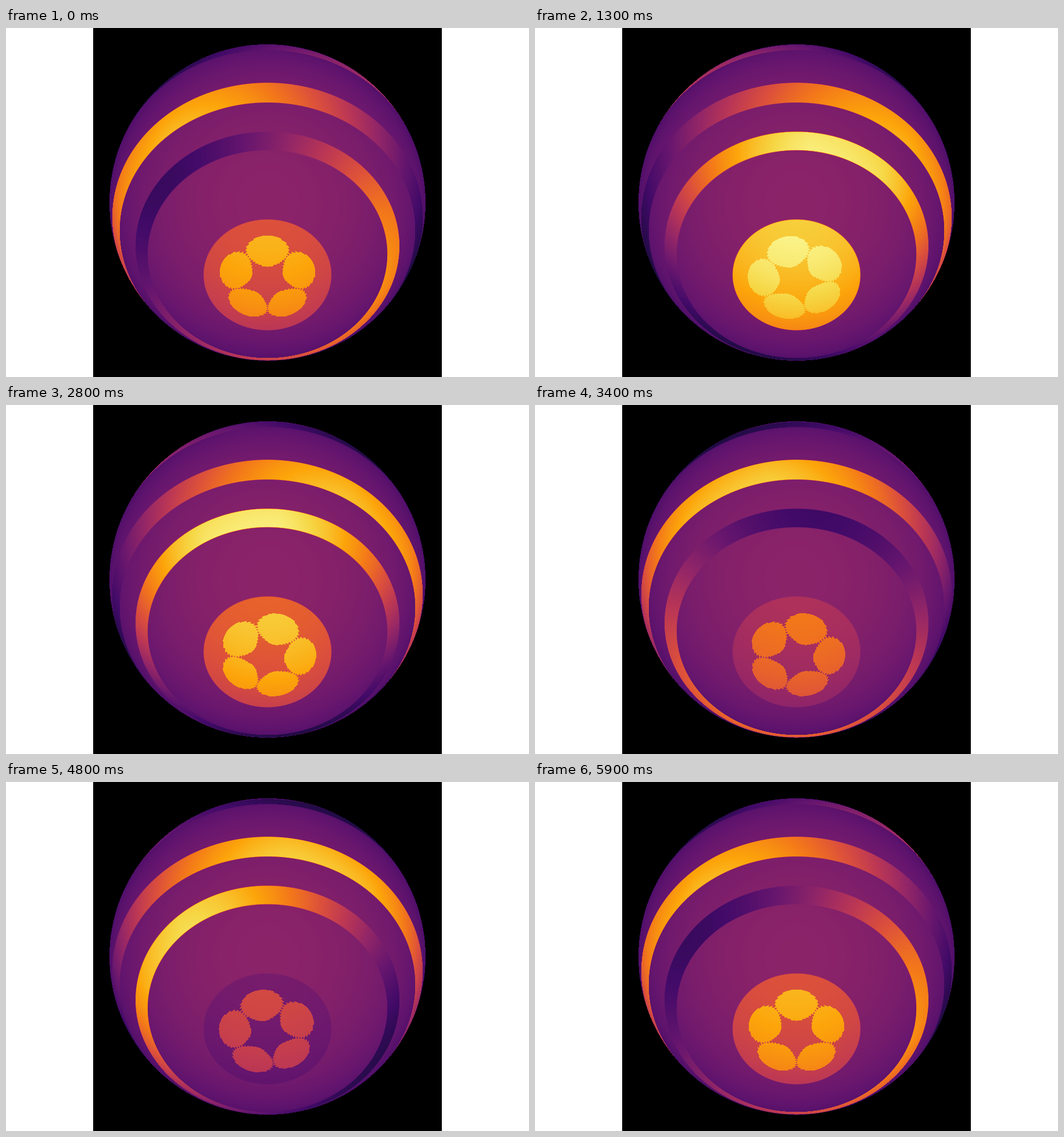
Animation of 900 by 600 pixels, one loop 6 s. Source, as an HTML page with a canvas:

```html
<!DOCTYPE html>
<html lang="en">
<head>
<meta charset="utf-8">
<title>Banded globe</title>
<style>
  html, body { margin: 0; width: 100%; height: 100%; overflow: hidden; background: #fff; }
  canvas { display: block; margin-left: 150px; }
</style>
</head>
<body>
<canvas id="stage" width="600" height="600"></canvas>
<script>
const SIZE = 600, RADIUS = 272, STEP = 100, STEPS = 60;
const DEG = Math.PI / 180;
const TILT_SIN = 0.5, TILT_COS = Math.cos(30 * DEG);
const BACKGROUND = 0.38, LIMB = 0.42;

// Colatitude range, phase at the start and turns per loop of each wave band
const BANDS = [
  { from: 49.3, to: 56.6, phase: 128, turns: -24 },
  { from: 69.2, to: 79.2, phase: -60, turns: -12 },
  { from: 104.4, to: 114.5, phase: 120, turns: -12 },
];
const CAP = { edge: 23.85, spotColat: 12, spotHeight: 6, spotWidth: 36, turns: -2 };

const STOPS = ['000004', '160b39', '420a68', '6a176e', '932667', 'bc3754',
  'dd513a', 'f37819', 'fca50a', 'f6d746', 'fcffa4']
  .map(hex => [0, 2, 4].map(i => parseInt(hex.slice(i, i + 2), 16)));

const clamp = (v, lo, hi) => Math.min(hi, Math.max(lo, v));
const mix = (a, b, f) => a + (b - a) * f;

const palette = Array.from({ length: 1024 }, (_, i) => {
  const p = i / 1023 * 10, n = Math.min(9, Math.floor(p));
  const [r, g, b] = STOPS[n].map((c, j) => Math.round(mix(c, STOPS[n + 1][j], p - n)));
  return (255 << 24 | b << 16 | g << 8 | r) >>> 0;
});

const ctx = document.getElementById('stage').getContext('2d');
const image = ctx.createImageData(SIZE, SIZE);
const pixels = new Uint32Array(image.data.buffer).fill(0xff000000);

// Project each pixel of the disc once; only bands and cap change later
const animated = [];
for (let py = 0; py < SIZE; py++) {
  for (let px = 0; px < SIZE; px++) {
    const x = (px + 0.5 - SIZE / 2) / RADIUS, y = (py + 0.5 - SIZE / 2) / RADIUS;
    const rr = x * x + y * y;
    if (rr > 1) continue;
    const z = Math.sqrt(1 - rr);
    const colat = Math.acos(clamp(y * TILT_SIN + z * TILT_COS, -1, 1)) / DEG;
    const lon = Math.atan2(x, z * TILT_SIN - y * TILT_COS);
    const light = 1 - LIMB * (1 - z);
    const at = py * SIZE + px;
    pixels[at] = palette[Math.round(BACKGROUND * light * 1023)];

    const cover = (from, to) => clamp(Math.min(colat - from, to - colat) / 0.3 + 0.5, 0, 1);
    const capCover = cover(-9, CAP.edge);
    if (capCover) animated.push({ at, colat, lon, light, cover: capCover, band: -1 });
    BANDS.forEach((b, band) => {
      const c = cover(b.from, b.to);
      if (c) animated.push({ at, colat, lon, light, cover: c, band });
    });
  }
}

function inSpot(colat, lon, turn) {
  const across = (CAP.spotColat - colat) / CAP.spotHeight;
  if (Math.abs(across) > 1) return false;
  const offset = (lon - turn) / DEG / 72;
  const tooth = 4 * Math.abs(2 * (colat % 1) - 1) - 2;
  const along = (Math.abs(offset - Math.round(offset)) * 72 + tooth) / CAP.spotWidth;
  return across * across + along * along < 1;
}

function draw(step) {
  const cycle = step / (STEPS - 1) * 2 * Math.PI;
  const cap = 0.6 + 0.29 * Math.sin(cycle);
  const capTurn = CAP.turns * cycle;
  const peaks = BANDS.map(b => b.phase * DEG + b.turns * cycle);
  for (const p of animated) {
    let value;
    if (p.band >= 0) value = 0.6 + 0.4 * Math.cos(p.lon - peaks[p.band]);
    else value = cap + (inSpot(p.colat, p.lon, capTurn) ? 0.24 : 0);
    value = mix(BACKGROUND, Math.min(value, 0.98), p.cover) * p.light;
    pixels[p.at] = palette[Math.round(value * 1023)];
  }
  ctx.putImageData(image, 0, 0);
}

const start = performance.now();
let shown = -1;
function tick() {
  const step = Math.floor((performance.now() - start) / STEP) % STEPS;
  if (step !== shown) draw(shown = step);
  requestAnimationFrame(tick);
}
tick();
</script>
</body>
</html>
```
